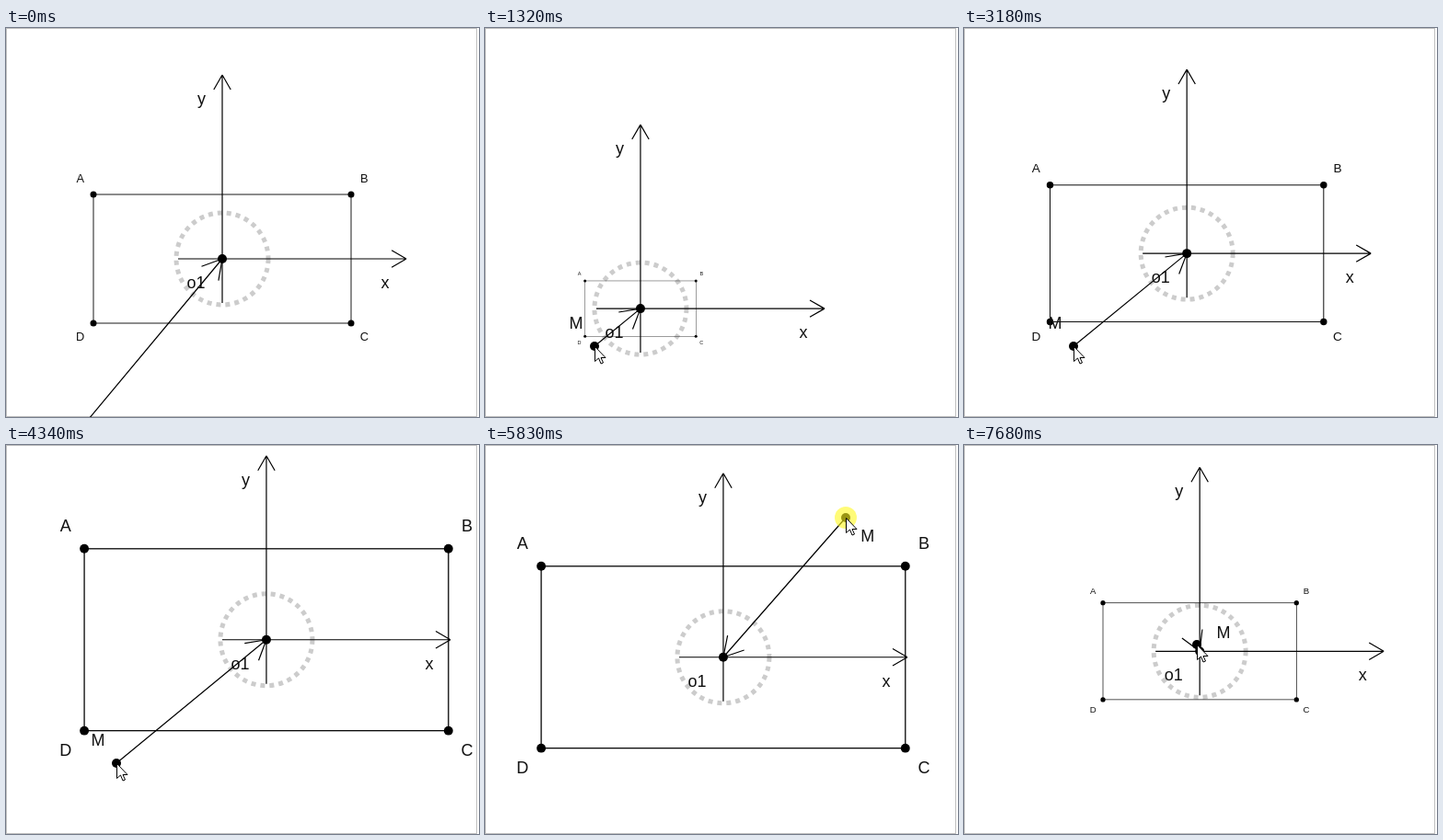
Recreate the animation shown at these times as an HTML page with a canvas. Size 514x423 px, loop 8 s.

```html
<!DOCTYPE html>
<html lang="en">
<head>
<meta charset="utf-8">
<title>Zoom around a pointer</title>
<style>
  html, body { margin: 0; width: 100%; height: 100%; overflow: hidden; background: #fff; }
  canvas { display: block; }
</style>
</head>
<body>
<canvas id="stage" width="514" height="423"></canvas>
<script>
const ctx = document.getElementById('stage').getContext('2d');
const LOOP = 8000;
const INK = '#000';
const LINE = 1.2;

// [action, first step (ms), last step (ms), steps, a, b]
// aim: move pointer to (a, b); drag: shift everything by (a, b); zoom: factor a, b wheel ticks
const actions = [
  ['aim', 70, 600, 8, 119, 346],
  ['zoom', 680, 680, 1, 0.9, 1],
  ['zoom', 840, 840, 1, 0.9, 2],
  ['zoom', 1150, 1320, 3, 0.9, 5],
  ['zoom', 1570, 1710, 3, 0.9, 5],
  ['zoom', 2180, 2330, 3, 1.1, 7],
  ['zoom', 2640, 2720, 2, 1.1, 5],
  ['zoom', 3100, 3340, 4, 1.1, 6],
  ['aim', 4340, 4340, 1, 120, 346],
  ['aim', 4420, 4880, 7, 416, 60],
  ['drag', 5110, 5350, 4, -27, 20],
  ['drag', 5430, 5510, 2, -10, 9],
  ['drag', 5750, 5830, 2, 13, -10],
  ['aim', 6070, 6070, 1, 430, 50],
  ['aim', 6210, 6760, 8, 254, 231],
  ['aim', 6910, 7060, 3, 253, 217],
  ['zoom', 7220, 7460, 4, 0.9, 4],
  ['zoom', 7680, 7680, 1, 0.9, 2],
];

const smooth = p => p * p * (3 - 2 * p);

function progress(t, first, last, steps) {
  if (t >= last) return 1;
  return (Math.floor((t - first) / (last - first) * (steps - 1) + 1e-6) + 1) / steps;
}

function stateAt(t) {
  const m = { x: 65, y: 455 }, o = { x: 235, y: 251 };
  let scale = 1;
  for (const [action, first, last, steps, a, b] of actions) {
    if (t < first) break;
    const p = progress(t, first, last, steps);
    if (action === 'aim') {
      m.x += (a - m.x) * smooth(p);
      m.y += (b - m.y) * smooth(p);
    } else if (action === 'drag') {
      for (const point of [m, o]) {
        point.x += a * p;
        point.y += b * p;
      }
    } else {
      const ratio = a ** Math.round(b * p);
      o.x = m.x + (o.x - m.x) * ratio;
      o.y = m.y + (o.y - m.y) * ratio;
      scale *= ratio;
    }
  }
  return { m, o, scale, pressed: t >= 5110 && t < 6070 };
}

function dot(x, y, r, color = INK) {
  ctx.fillStyle = color;
  ctx.beginPath();
  ctx.arc(x, y, r, 0, 2 * Math.PI);
  ctx.fill();
}

function text(label, x, baseline, size = 18) {
  ctx.font = `${size}px "Liberation Sans", Arial, sans-serif`;
  ctx.fillStyle = '#111';
  ctx.fillText(label, x, baseline);
}

function arrow(x1, y1, x2, y2, head) {
  const angle = Math.atan2(y2 - y1, x2 - x1);
  ctx.lineWidth = LINE;
  ctx.strokeStyle = INK;
  ctx.beginPath();
  ctx.moveTo(x1, y1);
  ctx.lineTo(x2, y2);
  for (const turn of [-Math.PI / 6, Math.PI / 6]) {
    ctx.moveTo(x2, y2);
    ctx.lineTo(x2 - head * Math.cos(angle + turn), y2 - head * Math.sin(angle + turn));
  }
  ctx.stroke();
}

function drawRectangle(o, s) {
  ctx.lineWidth = 0.9 * s;
  ctx.strokeRect(o.x - 140 * s, o.y - 70 * s, 280 * s, 140 * s);
  for (const [label, sx, sy] of [['A', -1, -1], ['B', 1, -1], ['C', 1, 1], ['D', -1, 1]]) {
    const x = o.x + sx * 140 * s, y = o.y + sy * 70 * s;
    dot(x, y, 3.5 * s);
    text(label, x + sx * 14.3 * s, y + (sy < 0 ? -13 : 19.3) * s, 12.8 * s);
  }
}

function drawAxes({ x, y }) {
  ctx.lineWidth = 5;
  ctx.strokeStyle = '#ccc';
  ctx.setLineDash([5, 5]);
  ctx.beginPath();
  ctx.arc(x, y, 50, 0, 2 * Math.PI);
  ctx.stroke();
  ctx.setLineDash([]);

  arrow(x - 48, y, x + 200, y, 18.4);
  arrow(x, y + 48, x, y - 200, 18.4);
  text('x', x + 177, y + 32);
  text('y', x - 22.5, y - 168);
  text('o1', x - 28.5, y + 32);
}

function drawPointer(m, o, pressed) {
  arrow(m.x, m.y, o.x, o.y, 24);
  dot(o.x, o.y, 5);
  dot(m.x, m.y, 5);
  // The label sits to the side of the arrow's tail.
  const angle = Math.atan2(o.y - m.y, o.x - m.x);
  text('M', m.x + 31.5 * Math.sin(angle), m.y - 31.5 * Math.cos(angle) + 5);
  if (pressed) dot(m.x, m.y, 12, 'rgba(255, 248, 30, 0.6)');

  ctx.save();
  ctx.translate(m.x + 0.5, m.y + 0.5);
  ctx.lineWidth = 1;
  ctx.fillStyle = '#fff';
  const cursor = new Path2D('M0 0V16L4 12.5L6.5 18.5L9 17.5L6.5 12H11.5Z');
  ctx.fill(cursor);
  ctx.stroke(cursor);
  ctx.restore();
}

function draw(now) {
  const { m, o, scale, pressed } = stateAt(now % LOOP);
  ctx.fillStyle = '#fff';
  ctx.fillRect(0, 0, 514, 423);
  ctx.textAlign = 'center';

  ctx.lineWidth = 1;
  ctx.strokeStyle = '#c0c0c0';
  ctx.strokeRect(0.5, 0.5, 511, 422);

  drawAxes(o);
  drawRectangle(o, scale);
  drawPointer(m, o, pressed);
}

const start = performance.now();
function tick() {
  draw(performance.now() - start);
  requestAnimationFrame(tick);
}
tick();
</script>
</body>
</html>
```
